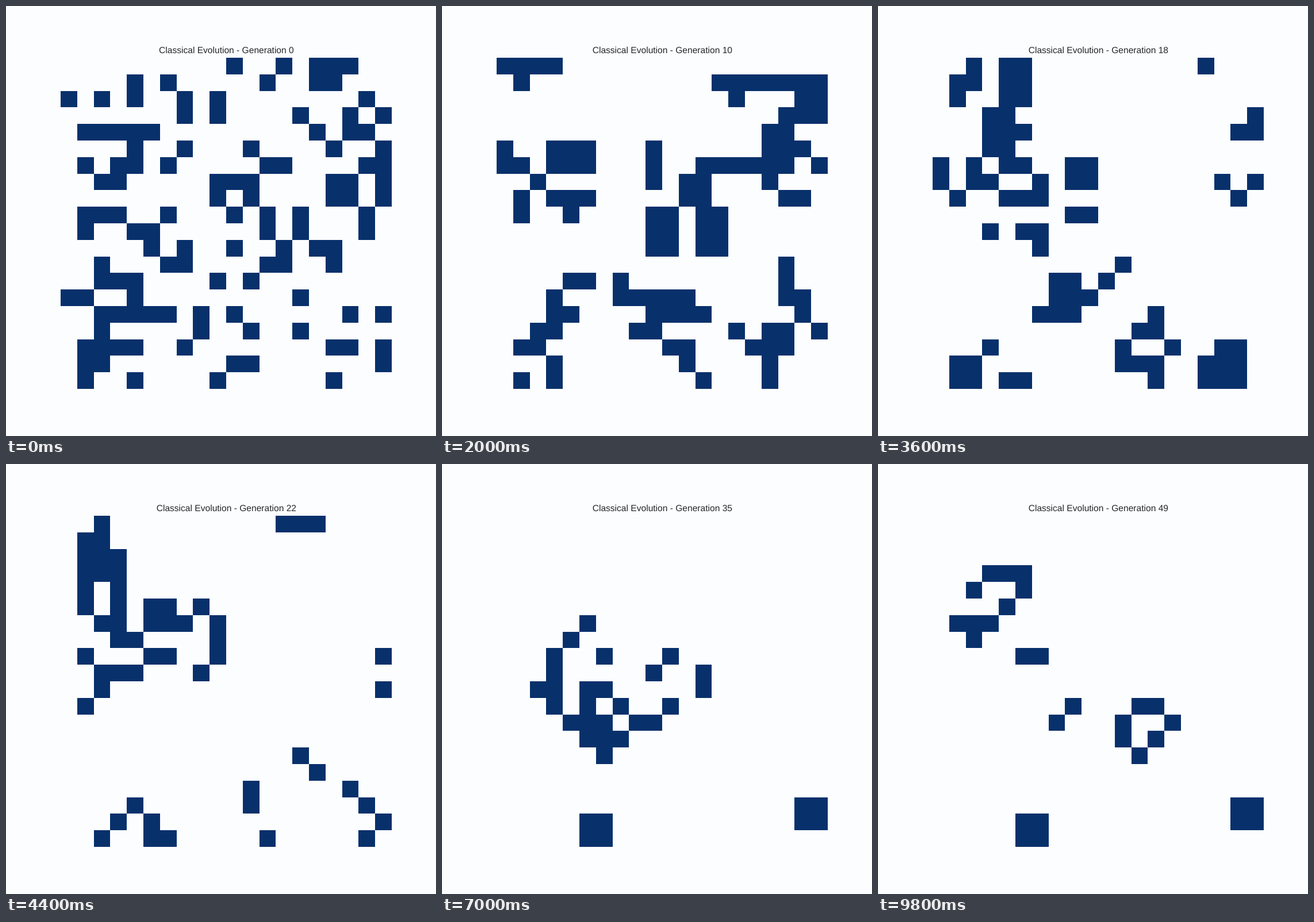
Recreate the animation shown at these times as an HTML page. Size 748 px wide and 748 px high, loop 10 s.

```html
<!DOCTYPE html>
<html lang="en">
<head>
<meta charset="utf-8">
<title>Classical Evolution</title>
<style>
  html, body { margin: 0; width: 100%; height: 100%; overflow: hidden; background: #fcfdff; }
  svg { display: block; width: 748px; height: 748px; }
  text {
    font: 15.58px "Liberation Sans", Arial, sans-serif;
    fill: #262626;
    text-anchor: middle;
    text-rendering: geometricPrecision;
  }
  path { fill: #08306b; shape-rendering: crispEdges; }
</style>
</head>
<body>
<svg viewBox="0 0 748 748">
  <text id="title" x="383.35" y="82"></text>
  <path id="cells"/>
</svg>
<script>
const SIZE = 20, STEP_MS = 200, GENERATIONS = 50;

const seed = [
  "..........#..#.###..",
  "....#.#.....#..##...",
  "#.#.#..#.#........#.",
  ".......#.#....#..#.#",
  ".#####.........#.##.",
  "....#..#...#....#..#",
  ".#.##.#.....##....##",
  "..##.....###....##.#",
  ".........#.#....##.#",
  ".###..#...#.#.#...#.",
  ".#..##......#.#...#.",
  ".....#.#..#..#.##...",
  "..#...##....##..#...",
  "..###....#.#........",
  "##..#.........#.....",
  "..#####.#.#......#.#",
  "..#.....#..#..#.....",
  ".####..#........##.#",
  ".##.......##.......#",
  ".#..#....#......#..."
].map(row => [...row].map(c => +(c === "#")));

const wrap = i => (i + SIZE) % SIZE;

// Game of Life on a torus
function evolve(grid) {
  return grid.map((row, r) => row.map((alive, c) => {
    let sum = -alive;
    for (let dr = -1; dr <= 1; dr++)
      for (let dc = -1; dc <= 1; dc++) sum += grid[wrap(r + dr)][wrap(c + dc)];
    return +(sum === 3 || (alive && sum === 2));
  }));
}

// Cell edges snap to an 800 px plot, then scale to the stage
const edges = start => Array.from({ length: SIZE + 1 },
  (_, i) => Math.round(Math.round(start + 30.8 * i) * 0.935));
const xs = edges(102), ys = edges(96);

function outline(grid) {
  let d = "";
  grid.forEach((row, r) => row.forEach((alive, c) => {
    if (alive) d += `M${xs[c]} ${ys[r]}H${xs[c + 1]}V${ys[r + 1]}H${xs[c]}Z`;
  }));
  return d;
}

const outlines = [];
for (let grid = seed; outlines.length < GENERATIONS; grid = evolve(grid)) outlines.push(outline(grid));

const title = document.getElementById("title");
const cells = document.getElementById("cells");
const start = performance.now();
let shown = -1;

function draw(now) {
  const generation = Math.floor(Math.max(0, now - start) / STEP_MS) % GENERATIONS;
  if (generation !== shown) {
    shown = generation;
    title.textContent = `Classical Evolution - Generation ${generation}`;
    cells.setAttribute("d", outlines[generation]);
  }
  requestAnimationFrame(draw);
}
draw(start);
</script>
</body>
</html>
```
